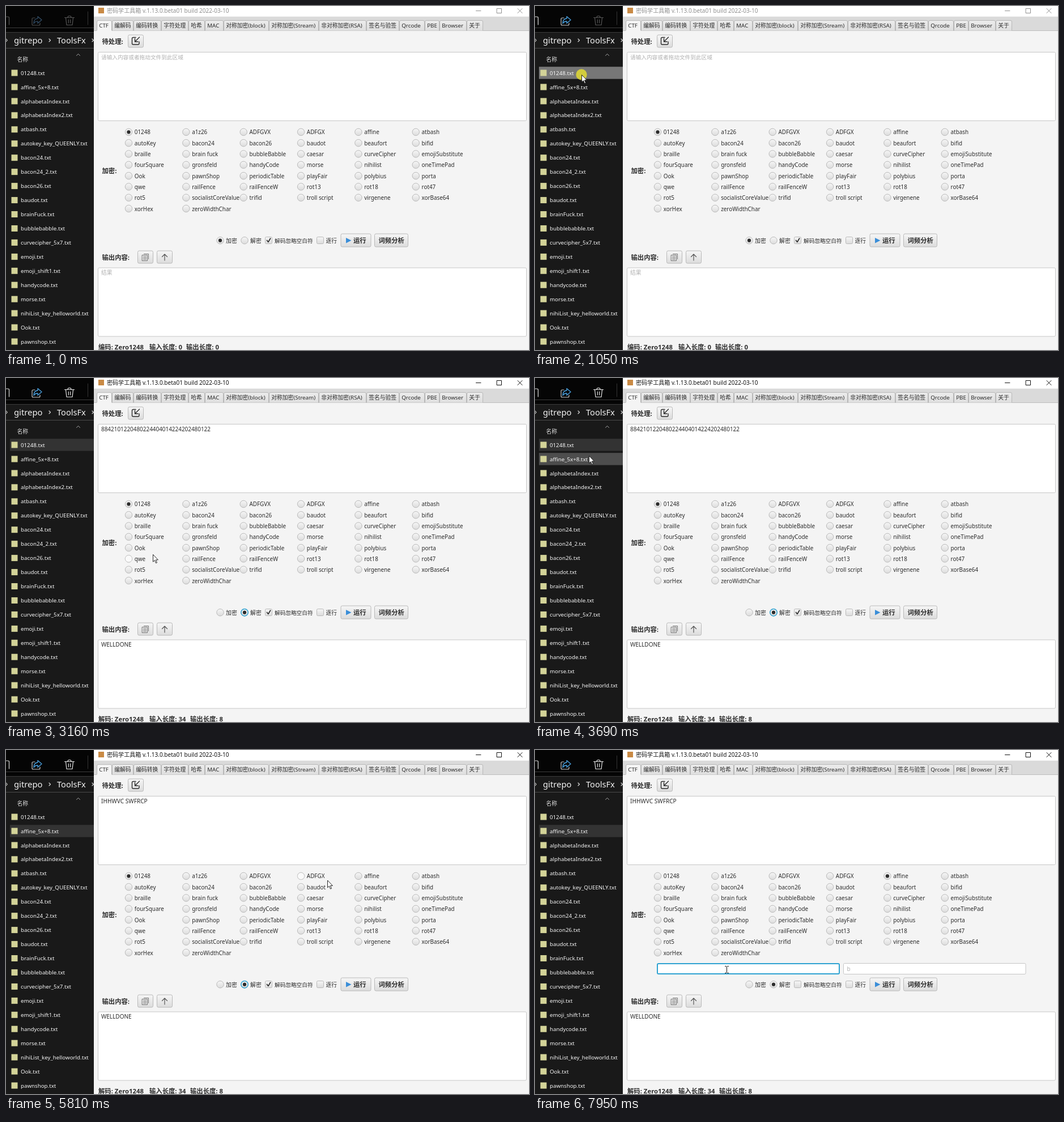
An HTML page for the animation above (8 s loop, 923 px wide and 607 px high).

```html
<!DOCTYPE html>
<html lang="zh-CN">
<head>
<meta charset="utf-8">
<title>密码学工具箱</title>
<style>
html, body { margin: 0; width: 100%; height: 100%; overflow: hidden; background: #f4f4f4; }
svg { display: block; position: absolute; left: 0; top: 0; }
text { font-family: "Noto Sans", "Noto Sans CJK SC", "Noto Sans CJK", sans-serif; white-space: pre; }
.line { fill: none; stroke-linecap: round; stroke-linejoin: round; }
</style>
</head>
<body>
<svg id="stage" width="923" height="607" viewBox="0 0 923 607">
  <defs>
    <linearGradient id="button" x2="0" y2="1">
      <stop stop-color="#f6f6f6"/><stop offset="1" stop-color="#dcdcdc"/>
    </linearGradient>
    <linearGradient id="tab" x2="0" y2="1">
      <stop stop-color="#ececec"/><stop offset="1" stop-color="#dedede"/>
    </linearGradient>
  </defs>
</svg>
<script>
const LOOP = 8000;
const INK = '#2b2b2b', HINT = '#b0b0b0', BLUE = '#2fa3d2';
const stage = document.getElementById('stage');
const timed = [];

function add(tag, attrs) {
  const el = document.createElementNS('http://www.w3.org/2000/svg', tag);
  for (const key in attrs) el.setAttribute(key, attrs[key]);
  return stage.appendChild(el);
}
const rect = (x, y, width, height, fill, more) => add('rect', { x, y, width, height, fill, ...more });
const line = (d, stroke, width = 1) => add('path', { d, stroke, 'stroke-width': width, class: 'line' });
function text(x, y, string, fill = INK, size = 9.87, weight = 400) {
  const el = add('text', { x, y, fill, 'font-size': size, 'font-weight': weight });
  el.textContent = string;
  return el;
}
const bold = (x, y, string) => text(x, y, string, INK, 11.35, 700);

// Shows elements only within [from, to).
function during(from, to, ...els) {
  els.forEach(el => timed.push({ el, from, to }));
}

// ---- file list ----
function fileList() {
  rect(0, 0, 155, 607, '#191919');
  rect(0, 0, 155, 47, '#050505');
  line('M0 38.5H155M0 46.5H155', '#3c3c3c');
  line('M0 74.5H155', '#4a4a4a');
  line('M144.5 10V33', '#333');

  const corner = 'M0 19H3.5Q5.5 19 5.5 21V33';
  during(0, 1050, line(corner, '#555', 1.2));
  during(1050, LOOP, line(corner, '#ddd', 1.2));

  const tray = 'M51 21H48Q46 21 46 23V32Q46 34 48 34H58Q60 34 60 32V30';
  const share = 'M56 18.5L63 24.5 56 30.5V27Q51 27 49 31 49 22.5 56 22Z';
  during(0, 1050, line(tray, '#4a4a4a', 1.2), line(share, '#34506a', 1.2));
  during(1050, LOOP, line(tray, '#c9c9c9', 1.2), line(share, '#4ca6e6', 1.3));

  const bin = 'M103.5 20.5H120.5M109 20Q109 17.5 112 17.5T115 20M105.5 21L107 33.5H117L118.5 21M110.3 24V30M113.7 24V30';
  during(0, 1570, line(bin, '#555', 1.2));
  during(1570, LOOP, line(bin, '#e6e6e6', 1.2));

  text(14, 66, 'gitrepo', '#f4f4f4', 14.8);
  text(90, 66, 'ToolsFx', '#f4f4f4', 14.6);
  line('M0 58L2.3 60.5 0 63M76 58L78.5 60.5 76 63M152 58L154.5 60.5 152 63', '#ddd', 1.1);
  text(19.5, 98, '名称', '#ddd', 9.8);
  line('M124.5 87.5L127.5 84.5 130.5 87.5', '#aaa');

  const files = `01248 affine_5x+8 alphabetaIndex alphabetaIndex2 atbash autokey_key_QUEENLY
    bacon24 bacon24_2 bacon26 baudot brainFuck bubblebabble curvecipher_5x7 emoji emoji_shift1
    handycode morse nihiList_key_helloworld Ook pawnshop`.split(/\s+/);
  const rowY = i => 107.2 + 24.95 * i;
  const mark = (i, from, to, fill) => during(from, to, rect(7, rowY(i), 148, 21.5, fill));
  mark(4, 510, 1050, '#4d4d4d');
  mark(0, 1050, 1570, '#777');
  mark(0, 1570, 4220, '#333');
  mark(1, 3690, 4220, '#4d4d4d');
  mark(1, 4220, LOOP, '#333');
  files.forEach((name, i) => {
    rect(9.5, rowY(i) + 5.3, 11, 11, '#d3d398');
    text(26, rowY(i) + 14.4, name + '.txt', '#f6f6f6', 9.72);
  });
}

// ---- window frame and tabs ----
function windowFrame() {
  rect(155, 0, 768, 607, '#f4f4f4');
  rect(155, 0, 768, 18, '#fff');
  rect(163, 3, 10, 10, '#c98a45');
  const frame = (from, to, color) => during(from, to,
    text(178, 12, '密码学工具箱 v.1.13.0.beta01 build 2022-03-10', color, 10.05),
    line('M829.5 8.5H838M866.5 4.5H874.5V12.5H866.5ZM903 4.5L911 12.5M911 4.5L903 12.5', color));
  frame(0, 2630, '#8f8f8f');
  frame(2630, LOOP, '#111');

  rect(155, 19, 768, 25, '#dadada');
  line('M156 43.5H923', '#bdbdbd');
  const tabs = ['CTF', '编解码', '编码转换', '字符处理', '哈希', 'MAC', '对称加密(block)', '对称加密(Stream)',
    '非对称加密(RSA)', '签名与验签', 'Qrcode', 'PBE', 'Browser', '关于'];
  const edges = [160, 187, 225, 274, 322, 351, 384, 464, 552, 636, 694, 739, 765, 813, 842];
  tabs.forEach((name, i) => {
    const x = edges[i] + .5, right = edges[i + 1] - .5;
    add('path', { d: `M${x} 43.5V28Q${x} 25.5 ${x + 2.5} 25.5H${right - 2.5}Q${right} 25.5 ${right} 28V43.5`,
      fill: i ? 'url(#tab)' : '#f4f4f4', stroke: '#b8b8b8' });
    text(x + 3.7, 38.3, name, INK, 9.8);
  });
  line('M161 43.5H186', '#f4f4f4', 1.4);
}

// ---- controls ----
const button = (x, y, w, h) =>
  rect(x + .5, y + .5, w - 1, h - 1, 'url(#button)', { rx: 2.5, stroke: '#b9b9b9' });
const area = (x, y, w, h) => rect(x + .5, y + .5, w, h, '#fff', { rx: 2, stroke: '#c6c6c6' });
const radio = (cx, cy) => add('circle', { cx, cy, r: 6.2, fill: 'url(#button)', stroke: '#b9b9b9' });
const dot = (cx, cy) => add('circle', { cx, cy, r: 3.1, fill: INK });
const ring = (cx, cy) => add('circle', { cx, cy, r: 6.2, fill: 'none', stroke: BLUE, 'stroke-width': 1.5 });
const lit = (cx, cy) => add('circle', { cx, cy, r: 6.2, fill: '#fafafa', stroke: '#c9c9c9' });
const box = x => rect(x + .5, 407.5, 12, 12, 'url(#button)', { rx: 2, stroke: '#b9b9b9' });

function cipherGrid() {
  const names = `01248 a1z26 ADFGVX ADFGX affine atbash autoKey bacon24 bacon26 baudot beaufort bifid
    braille brain_fuck bubbleBabble caesar curveCipher emojiSubstitute fourSquare gronsfeld handyCode
    morse nihilist oneTimePad Ook pawnShop periodicTable playFair polybius porta qwe railFence
    railFenceW rot13 rot18 rot47 rot5 socialistCoreValue trifid troll_script virgenene xorBase64
    xorHex zeroWidthChar`.split(/\s+/);
  const at = name => {
    const i = names.indexOf(name);
    return [216.5 + 101.35 * (i % 6), 222.4 + 19.3 * Math.floor(i / 6)];
  };
  names.forEach(name => {
    const [x, y] = at(name);
    radio(x, y);
    text(x + 10.3, y + 4, name.replace('_', ' '));
  });
  during(1570, 2100, lit(...at('bacon24')));
  during(2630, 3690, lit(...at('qwe')));
  during(5300, 5810, lit(...at('bacon26')));
  during(5810, 6340, lit(...at('ADFGX')));
  during(0, 6870, dot(...at('01248')));
  during(6340, 7420, ring(...at('affine')));
  during(6870, LOOP, dot(...at('affine')));
}

function inputPane() {
  bold(169.5, 66.5, '待处理:');
  button(215, 50.5, 28, 23);
  line('M229 55.5H224.5Q222.5 55.5 222.5 57.5V66Q222.5 68 224.5 68H233Q235 68 235 66V63M235.5 55L227.5 63M227.5 57.5V63H233', INK, 1.4);
  area(162, 81, 756, 121);
  during(0, 1570, text(168, 93.5, '请输入内容或者拖动文件到此区域', HINT, 9.67));
  during(1570, 4220, text(168, 93.5, '8842101220480224404014224202480122', INK, 9.93));
  during(4220, LOOP, text(168, 93.5, 'IHHWVC SWFRCP', INK, 10.1));
}

function keyFields() {
  const field = x => rect(x + .5, 376.5, 321.5, 19, '#fff', { rx: 2, stroke: '#c6c6c6' });
  during(6870, 7420, field(215), text(221.5, 389.8, 'a', HINT));
  during(7420, LOOP, rect(216, 377, 321, 18, '#fff', { rx: 2, stroke: BLUE, 'stroke-width': 2 }));
  during(6870, LOOP, field(544), text(550.5, 389.8, 'b', HINT));
}

function actionBar() {
  bold(169.5, 295, '加密:');
  radio(378, 413.7);
  radio(421, 413.7);
  during(0, 2630, dot(378, 413.7));
  during(2630, LOOP, dot(421, 413.7));
  during(2630, 6340, ring(421, 413.7));
  text(388, 417.7, '加密', INK, 9.9);
  text(431, 417.7, '解密', INK, 9.9);
  box(457);
  during(0, 6870, line('M460.5 413.5L462.8 416.5 466.7 410', INK, 1.6));
  text(474, 417.7, '解码忽略空白符', INK, 9.67);
  box(548);
  text(564.5, 417.7, '逐行', INK, 9.8);
  button(590.5, 401.5, 54, 24);
  add('path', { d: 'M600 409L609.5 413.7 600 418.5Z', fill: '#3a8ed8' });
  bold(613, 418, '运行');
  button(650, 401.5, 60, 24);
  bold(657.5, 418, '词频分析');
}

function outputPane() {
  bold(169.5, 447.5, '输出内容:');
  button(232, 431.5, 28, 23);
  line('M243.5 437.5H251.5V446.5M240.5 439.5H249.5V449.5H240.5ZM242.5 442H247.5M242.5 444.5H247.5M242.5 447H247.5', '#777');
  button(266, 431.5, 28, 23);
  line('M280 449V438M275.5 442.5L280 438 284.5 442.5', '#555', 1.2);
  area(162, 461.5, 756, 121);
  during(0, 2630, text(168, 474, '结果', HINT, 9.8));
  during(2630, LOOP, text(168, 474, 'WELLDONE', INK, 10));

  const status = (from, to, mode, a, b, x) => during(from, to,
    bold(163, 605.5, mode + ': Zero1248'),
    bold(253, 605.5, '输入长度: ' + a),
    bold(x, 605.5, '输出长度: ' + b));
  status(0, 2630, '编码', 0, 0, 318);
  status(2630, LOOP, '解码', 34, 8, 325);
}

// ---- pointer and dragged file ----
function pointer() {
  during(4220, 4750,
    rect(248.5, 69.5, 80.5, 80, '#f7f7f7', { rx: 3, stroke: '#d2d2d2', 'fill-opacity': .92 }),
    rect(256, 79, 64, 64, '#c3d36a'),
    add('circle', { cx: 306, cy: 159.5, r: 4.3, fill: '#fff', stroke: '#a8682c', 'stroke-width': 1.3 }),
    line('M303 156.5L309 162.5', '#a8682c', 1.2));

  const press = (from, to, cx, cy) =>
    during(from, to, add('circle', { cx, cy, r: 9.7, fill: '#f0e82a', opacity: .75 }));
  press(1050, 1570, 82, 121);
  press(4220, 4750, 289, 142.5);
  press(6340, 6870, 629, 226);
  press(7420, 7950, 338, 390.5);

  const arrow = (from, to, x, y) => during(from, to, add('path', {
    d: 'M.5 .5V13.3L3.4 10.6 5.5 15.6 7.5 14.8 5.4 9.9H9.4Z',
    transform: `translate(${x} ${y})`, fill: '#fff', stroke: '#111', 'stroke-width': .9 }));
  const beam = (from, to, x, y) => {
    const cap = (end, inner) => `M${x - 3} ${end}H${x - 1}L${x} ${inner} ${x + 1} ${end}H${x + 3}`;
    during(from, to, line(`${cap(y - 6, y - 5)}M${x} ${y - 5}V${y + 5}${cap(y + 6, y + 5)}`, '#111'));
  };
  arrow(510, 1050, 118, 211);
  arrow(1050, 1570, 82, 121);
  arrow(1570, 2100, 400, 256);
  arrow(2100, 2630, 452.5, 421.5);
  arrow(2630, 3160, 434, 424);
  arrow(3160, 3690, 259, 311);
  arrow(3690, 4220, 95, 137);
  arrow(4220, 4750, 289.5, 141.5);
  beam(4750, 5300, 358, 196.5);
  arrow(5300, 5810, 431, 234);
  arrow(5810, 6340, 567, 229.5);
  arrow(6340, 6870, 629, 226);
  arrow(6870, 7420, 430, 398);
  beam(7420, LOOP, 338.5, 387.5);
}

[fileList, windowFrame, inputPane, cipherGrid, keyFields, actionBar, outputPane, pointer].forEach(draw => draw());

const start = performance.now();
function tick() {
  const t = (performance.now() - start) % LOOP;
  for (const { el, from, to } of timed) el.style.display = t >= from && t < to ? '' : 'none';
  requestAnimationFrame(tick);
}
tick();
</script>
</body>
</html>
```
